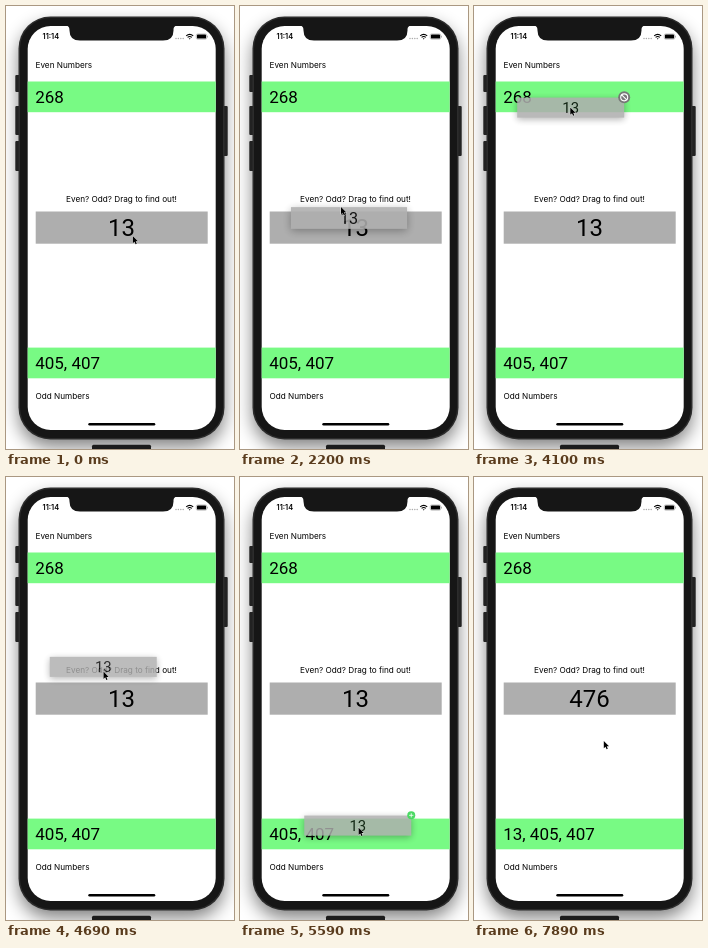
Write an HTML page that moves like this. It is 228 px wide and 443 px high and loops after 7.99 s.

```html
<!DOCTYPE html>
<html lang="en">
<head>
<meta charset="utf-8">
<title>Drag and drop numbers</title>
<style>
  html, body { margin: 0; width: 100%; height: 100%; overflow: hidden; background: #fff; }
  svg { display: block; width: 100vw; height: 100vh; }
  .label { font: 8.2px Inter, sans-serif; }
  .time { font: 600 7.4px Inter, sans-serif; }
  .list { font: 17px Roboto, sans-serif; }
  .number { font: 24px Roboto, sans-serif; text-anchor: middle; }
</style>
</head>
<body>
<svg viewBox="0 0 228 443">
  <defs>
    <filter id="phoneBlur" x="-30%" y="-20%" width="160%" height="140%">
      <feGaussianBlur stdDeviation="9"/>
    </filter>
    <filter id="softBlur" x="-30%" y="-150%" width="160%" height="400%">
      <feGaussianBlur stdDeviation="6"/>
    </filter>
  </defs>

  <!-- Phone body -->
  <rect width="228" height="443" fill="#fff"/>
  <rect x="13" y="19" width="205" height="422" rx="32" opacity=".5" filter="url(#phoneBlur)"/>
  <rect x="86" y="438.8" width="59" height="10" rx="1.5" fill="#1c1c1c"/>
  <g fill="#222">
    <rect x="9.3" y="69" width="6" height="17" rx="1"/>
    <rect x="9.3" y="100" width="6" height="29" rx="1"/>
    <rect x="9.3" y="135" width="6" height="30" rx="1"/>
    <rect x="216" y="100" width="5.7" height="50" rx="1"/>
  </g>
  <rect x="12.5" y="10.5" width="206" height="423" rx="32" fill="#2c2c2c"/>
  <rect x="14" y="12" width="203" height="420" rx="30.5" fill="#161616"/>
  <rect x="21.7" y="20" width="188" height="404" rx="23" fill="#fff"/>
  <path d="M60 19.5C62.5 20 63.5 21 63.5 24.5Q63.5 34.6 74 34.6H157Q167.5 34.6 167.5 24.5C167.5 21 168.5 20 171 19.5Z" fill="#161616"/>

  <!-- Status bar -->
  <text class="time" x="36.5" y="33.3">11:14</text>
  <g fill="#aaa">
    <circle cx="170" cy="32.4" r=".75"/><circle cx="172.4" cy="32.4" r=".75"/>
    <circle cx="174.8" cy="32.4" r=".75"/><circle cx="177.2" cy="32.4" r=".75"/>
  </g>
  <g fill="none" stroke="#000" stroke-width="1.15">
    <path d="M180.2 29.9Q183.7 26.7 187.2 29.9M181.6 31.4Q183.7 29.6 185.8 31.4"/>
    <path d="M183.7 33.5L182.8 32.5Q183.7 31.9 184.6 32.5Z" fill="#000" stroke="none"/>
  </g>
  <rect x="190.2" y="27.9" width="10.6" height="5.4" rx="1.5" fill="none" stroke="#999" stroke-width=".5"/>
  <rect x="190.9" y="28.6" width="9.2" height="4" rx=".9"/>
  <rect x="201.3" y="29.8" width=".7" height="1.7" rx=".3" fill="#999"/>

  <!-- App screen -->
  <text class="label" x="29.5" y="62">Even Numbers</text>
  <rect x="21.7" y="75.5" width="188" height="30.7" fill="#78fa84"/>
  <text class="list" x="29.2" y="97.4">268</text>
  <text class="label" x="115.5" y="196.4" text-anchor="middle">Even? Odd? Drag to find out!</text>
  <rect x="29.7" y="205.5" width="172" height="32.2" fill="#aeaeae"/>
  <text class="number" x="115.6" y="230.2" id="current"></text>
  <rect x="21.7" y="341.6" width="188" height="30.7" fill="#78fa84"/>
  <text class="list" x="29.2" y="363.2" id="odds"></text>
  <text class="label" x="29.5" y="392.6">Odd Numbers</text>
  <rect x="82.3" y="416.9" width="67" height="2.6" rx="1.3"/>

  <!-- Dragged copy -->
  <g id="preview">
    <rect id="shadow" x="-86" y="-13" width="172" height="32" filter="url(#softBlur)"/>
    <rect x="-86" y="-16.1" width="172" height="32.2" fill="#aeaeae"/>
    <text class="number" y="8.6">13</text>
  </g>
  <g id="forbid">
    <circle r="6" fill="#777"/>
    <path d="M-2.5 -2.5L2.5 2.5M3.5 0A3.5 3.5 0 1 1 -3.5 0A3.5 3.5 0 1 1 3.5 0" fill="none" stroke="#fff" stroke-width="1.1"/>
  </g>
  <g id="plus">
    <circle r="6" fill="#4cd964"/>
    <path d="M-3.2 0H3.2M0 -3.2V3.2" stroke="#fff" stroke-width="1.2"/>
  </g>
  <path id="cursor" d="M0 0V7.3L1.7 5.7L2.8 8.3L4 7.8L2.9 5.3H5.2Z" stroke="#fff" stroke-width=".7" paint-order="stroke"/>
</svg>
<script>
const LOOP = 7990, DROP = 6390;
const el = id => document.getElementById(id);
const [current, odds, preview, shadow, forbid, plus, cursor] =
  ["current", "odds", "preview", "shadow", "forbid", "plus", "cursor"].map(el);

// time, x, y
const cursorKeys = [
  [0, 126.8, 230], [600, 122.5, 228], [1700, 122.5, 228], [2200, 101, 201],
  [2500, 96.5, 175], [2800, 96, 138], [3300, 96.3, 101.5], [4100, 96.3, 101.5],
  [4500, 97, 170], [4890, 99, 266], [5190, 113, 321.5], [5690, 120, 358],
  [5890, 123, 359], [7490, 123, 359], [7890, 129.8, 264]
];

// time, center x, center y, scale, opacity
const previewKeys = [
  [1100, 115.7, 221.6, 1, 1], [1400, 115.7, 221.6, 1.04, 1],
  [1700, 115.7, 221.6, 1.04, 1], [2200, 109, 212, .675, .88],
  [2500, 97.5, 181, .622, .82], [2800, 96.5, 144, .622, .82],
  [3300, 96.7, 101.6, .622, .86], [4100, 96.7, 101.6, .622, .86],
  [4500, 97, 165, .622, .82], [4890, 98, 262, .622, .82],
  [5190, 112.8, 319, .622, .82], [5690, 119, 356, .622, .84],
  [5890, 123, 357, .622, .84], [DROP, 123, 357, .622, .84],
  [7190, 108, 357.5, .3, 0]
];

// time, size
const forbidKeys = [[3300, 0], [3600, 1], [4100, 1], [4300, 0]];
const plusKeys = [[5390, 0], [5690, 1], [DROP - 1, 1], [DROP, 0]];

function sample(keys, t) {
  const i = keys.findIndex(k => k[0] > t);
  if (i === 0) return keys[0].slice(1);
  if (i < 0) return keys[keys.length - 1].slice(1);
  const a = keys[i - 1], b = keys[i];
  const p = (t - a[0]) / (b[0] - a[0]);
  return a.slice(1).map((v, j) => v + (b[j + 1] - v) * p);
}

function place(node, x, y, scale = 1) {
  node.setAttribute("transform", `translate(${x} ${y}) scale(${scale})`);
}

function show(node, on) {
  node.setAttribute("visibility", on ? "visible" : "hidden");
}

// The motion advances in steps of a tenth of a second.
function step(t) {
  const offset = t < 4890 ? 0 : 90;
  return Math.floor((t - offset) / 100) * 100 + offset;
}

function draw(time) {
  const t = step(time);
  const dropped = t >= DROP;
  current.textContent = dropped ? "476" : "13";
  odds.textContent = dropped ? "13, 405, 407" : "405, 407";

  const [x, y, scale, alpha] = sample(previewKeys, t);
  place(preview, x, y, scale);
  preview.setAttribute("opacity", alpha);
  shadow.setAttribute("opacity", .35 * Math.min(1, Math.max(0, (t - 1100) / 300)));
  show(preview, t > 1100 && alpha > 0);

  for (const [badge, keys] of [[forbid, forbidKeys], [plus, plusKeys]]) {
    const [size] = sample(keys, t);
    place(badge, x + 86 * scale, y - 16.5 * scale, size);
    show(badge, size > 0);
  }
  place(cursor, ...sample(cursorKeys, t));
}

const start = performance.now();
function tick() {
  draw((performance.now() - start) % LOOP);
  requestAnimationFrame(tick);
}
tick();
</script>
</body>
</html>
```
